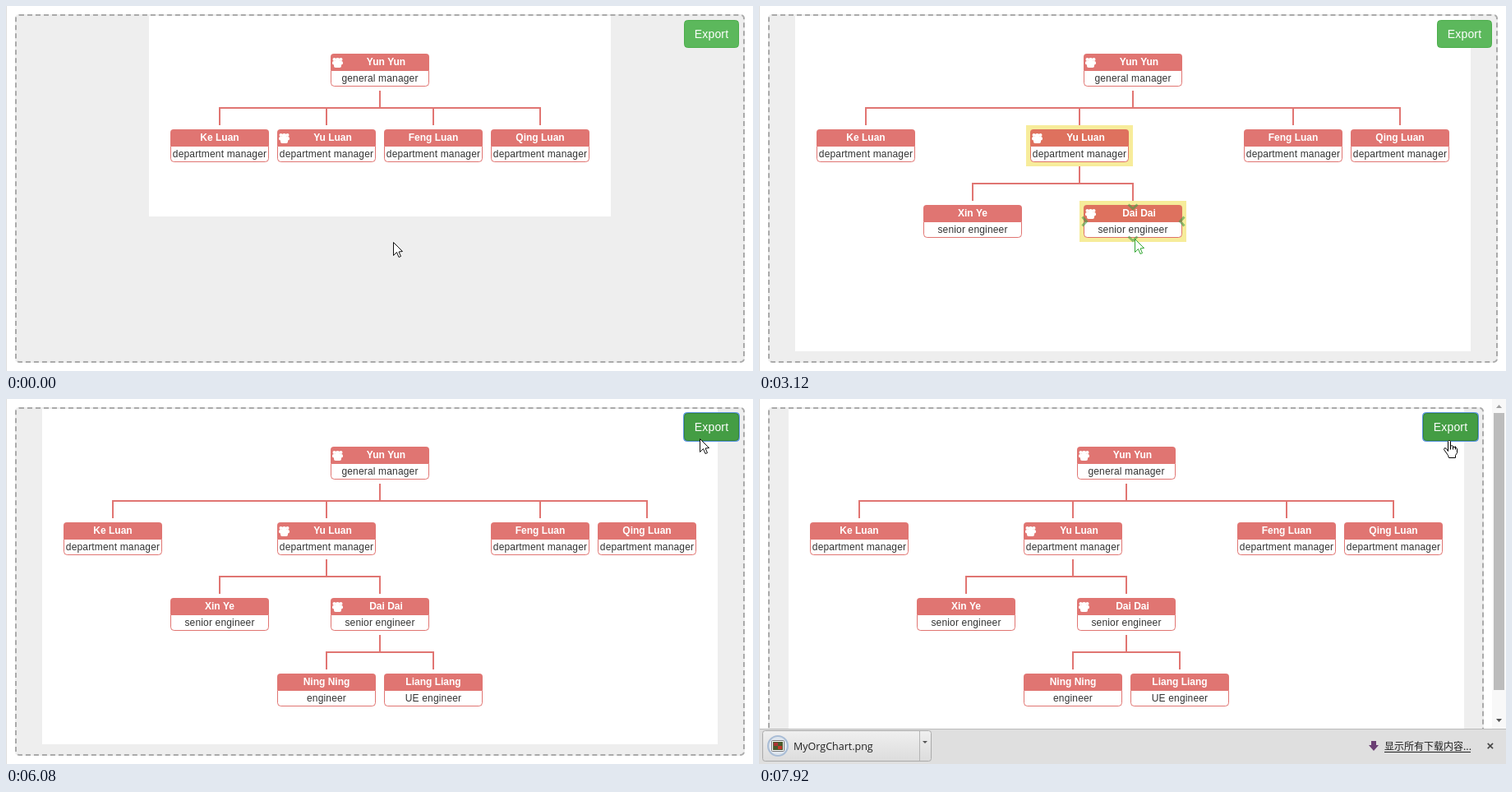
An HTML page with a canvas that plays this animation: 909 px wide and 444 px high, repeating every 8000 ms.

```html
<!DOCTYPE html>
<html lang="en">
<head>
<meta charset="utf-8">
<title>Org chart export</title>
<style>
html, body { margin: 0; width: 909px; height: 444px; overflow: hidden; background: #fff; }
#frame { position: absolute; left: 11px; top: 10px; width: 888px; height: 424px; box-sizing: border-box;
  border: 2px dashed #aaa; border-radius: 5px; background: #eee; }
canvas { position: absolute; left: 0; top: 0; }
</style>
</head>
<body>
<div id="frame"></div>
<canvas id="stage" width="909" height="444"></canvas>
<script>
const LOOP = 8000, FADE = 300;
const OPEN_1 = 1880, OPEN_2 = 3120, BLUR = 4320;
const MASK_ON = 6200, MASK_OFF = 7100, SCROLLBAR = 7430;
const RED = 'rgba(217,83,79,.8)';
const SANS = 'Arial, "Liberation Sans", sans-serif';

const frame = document.getElementById('frame');
const ctx = document.getElementById('stage').getContext('2d');

// Centre x of each node per expansion stage; missing entries are hidden.
const nodes = [
  { name: 'Yun Yun', role: 'general manager', level: 0, x: [455, 455, 455], group: true },
  { name: 'Ke Luan', role: 'department manager', level: 1, x: [260, 195, 130] },
  { name: 'Yu Luan', role: 'department manager', level: 1, x: [390, 390, 390], group: true, hover: [1280, 2180], focus: [1280, OPEN_2] },
  { name: 'Feng Luan', role: 'department manager', level: 1, x: [520, 585, 650] },
  { name: 'Qing Luan', role: 'department manager', level: 1, x: [650, 715, 780], focus: [4850, 4960] },
  { name: 'Xin Ye', role: 'senior engineer', level: 2, x: [, 325, 260] },
  { name: 'Dai Dai', role: 'senior engineer', level: 2, x: [, 455, 455], group: true, hover: [2310, 3380], focus: [2320, BLUR] },
  { name: 'Ning Ning', role: 'engineer', level: 3, x: [, , 390] },
  { name: 'Liang Liang', role: 'UE engineer', level: 3, x: [, , 520] }
];
const panels = [[174, 562, 244], [109, 692, 316], [44, 822, 408]];

// Pointer path: time, x, y
const path = [
  [320, 471, 287], [1040, 431, 198], [1280, 431, 198], [1680, 389, 189], [2120, 389, 189],
  [2400, 475, 271], [2720, 457, 283], [3280, 457, 283], [3680, 608, 346], [3920, 617, 341],
  [4320, 617, 341], [4560, 617, 336], [4640, 617, 336], [5040, 808, 93], [5360, 837, 52],
  [5520, 837, 52], [5680, 844, 48], [7600, 844, 48], [7880, 837, 50]
];

const clamp = v => Math.max(0, Math.min(1, v));
const smooth = v => { v = clamp(v); return v * v * (3 - 2 * v); };
const ramp = (t, start, span = FADE) => smooth((t - start) / span);
const pulse = (t, span) => span ? ramp(t, span[0]) - ramp(t, span[1]) : 0;

function rect(x, y, w, h, fill, radius = 0, stroke) {
  ctx.beginPath();
  ctx.roundRect(x, y, w, h, radius);
  if (fill) { ctx.fillStyle = fill; ctx.fill(); }
  if (stroke) { ctx.strokeStyle = stroke; ctx.lineWidth = 1; ctx.stroke(); }
}

function text(str, x, y, font, color, align = 'center', spacing = 0) {
  ctx.font = font;
  ctx.fillStyle = color;
  ctx.textAlign = align;
  ctx.letterSpacing = spacing + 'px';
  ctx.fillText(str, x, y);
}

function polygon(points, fill, stroke) {
  ctx.beginPath();
  points.forEach(([x, y]) => ctx.lineTo(x, y));
  ctx.closePath();
  ctx.fillStyle = fill;
  ctx.fill();
  if (stroke) { ctx.strokeStyle = stroke; ctx.lineWidth = 1; ctx.stroke(); }
}

function disc(x, y, r, fill) {
  rect(x - r, y - r, 2 * r, 2 * r, fill, r);
}

function chevron(x, y, turn) {
  ctx.save();
  ctx.translate(x, y);
  ctx.rotate(turn);
  ctx.beginPath();
  ctx.moveTo(-5.5, -2.5);
  ctx.lineTo(0, 2.5);
  ctx.lineTo(5.5, -2.5);
  ctx.strokeStyle = 'rgba(68,157,68,.6)';
  ctx.lineWidth = 3;
  ctx.stroke();
  ctx.restore();
}

function groupIcon(x, y) {
  disc(x + 2.5, y + 3, 2, '#fff');
  disc(x + 10.5, y + 3, 2, '#fff');
  rect(x, y + 5, 13, 4.5, '#fff', 2);
  disc(x + 6.5, y + 4, 3, '#fff');
  rect(x + 2, y + 7, 9, 6, '#fff', 2);
}

function drawNode(node, x, y, t) {
  const left = x - 60, glow = pulse(t, node.focus);
  if (glow > 0) rect(left - 5, y - 5, 130, 50, `rgba(238,217,54,${glow / 2})`);
  rect(left, y, 120, 20, RED, [4, 4, 0, 0]);
  rect(left + .5, y + 20.5, 119, 19, '#fff', [0, 0, 4, 4], RED);
  text(node.name, x + (node.group ? 7.5 : 0), y + 14, 'bold 12px ' + SANS, '#fff');
  text(node.role, x, y + 34, '12px ' + SANS, '#333', 'center', .16);
  if (node.group) groupIcon(left + 2, y + 4);
  const arrows = pulse(t, node.hover);
  if (arrows > 0) {
    ctx.save();
    ctx.globalAlpha *= arrows;
    chevron(x, y + 2, 0);
    chevron(x, y + 41, 0);
    chevron(left + 1, y + 20, -Math.PI / 2);
    chevron(left + 120, y + 20, Math.PI / 2);
    ctx.restore();
  }
}

function connect(parentX, childXs, parentY) {
  const first = Math.min(...childXs), last = Math.max(...childXs);
  rect(parentX - 1, parentY + 45, 2, 20, RED);
  rect(first - 1, parentY + 65, last - first + 2, 2, RED);
  childXs.forEach(x => rect(x - 1, parentY + 67, 2, 20, RED));
}

function drawChart(t) {
  const stage = t < OPEN_1 ? 0 : t < OPEN_2 ? 1 : 2;
  const [px, pw, ph] = panels[stage];
  rect(px, 12, pw, ph, '#fff');
  const parents = [455, 390, 455];
  for (let level = 0; level <= stage + 1; level++) {
    const shown = level < 2 ? 1 : ramp(t, level === 2 ? OPEN_1 : OPEN_2);
    const y = 58 + 92 * level;
    const row = nodes.filter(n => n.level === level);
    ctx.save();
    ctx.globalAlpha = shown;
    ctx.translate(0, -40 * (1 - shown));
    if (level) connect(parents[level - 1], row.map(n => n.x[stage]), y - 92);
    row.forEach(n => drawNode(n, n.x[stage], y, t));
    ctx.restore();
  }
}

function drawButton(t, shift) {
  const hot = t >= 5590;
  if (t >= 5900) rect(824.5 - shift, 16.5, 68, 35, '#5c97e0', 4, '#5c97e0');
  rect(825.5 - shift, 17.5, 66, 33, hot ? '#449d44' : '#5cb85c', 4, hot ? '#398439' : '#4cae4c');
  text('Export', 858.5 - shift, 39, '14px ' + SANS, '#fff', 'center', .15);
}

function drawMask(t) {
  rect(13, 12, 884, 420, 'rgba(0,0,0,.3)', 3);
  const turn = (t - MASK_ON) / 2000 * 2 * Math.PI - Math.PI / 2;
  ctx.beginPath();
  ctx.arc(455.5, 220.5, 45, turn + .13, turn + 2 * Math.PI - .13);
  ctx.strokeStyle = 'rgba(255,255,255,.8)';
  ctx.lineWidth = 15;
  ctx.stroke();
}

function drawScrollbar() {
  rect(892, 0, 17, 444, '#f8f8f8');
  rect(894, 17, 13, 337, '#bcbcbc');
  polygon([[897, 11], [900.5, 7], [904, 11]], '#a0a0a0');
  polygon([[897, 389], [900.5, 393], [904, 389]], '#555');
}

function drawDownloads(t) {
  const up = ramp(t, 7340, 260);
  ctx.save();
  ctx.translate(0, 43 * (1 - up));
  rect(1, 401, 908, 43, '#dfdfdf');
  rect(1, 401, 908, 1, '#bbb');
  const item = ctx.createLinearGradient(0, 403, 0, 441);
  item.addColorStop(0, '#f0f0f0');
  item.addColorStop(1, '#dcdcdc');
  rect(4.5, 403.5, 205, 37, item, 3, '#aaa');
  rect(195, 404, 1, 36, '#b5b5b5');
  polygon([[199, 416], [205, 416], [202, 419]], '#555');
  disc(23, 422, 13, '#a9bdd6');
  disc(23, 422, 11, '#dfe6ee');
  rect(15.5, 415.5, 15, 13, '#fff', 1, '#777');
  rect(17, 417, 12, 10, '#4a5a2c');
  rect(18, 418, 5, 4, '#a33');
  rect(23, 422, 5, 4, '#c0392b');
  text('MyOrgChart.png', 42, 427, '12.5px "Open Sans", sans-serif', '#222', 'left');
  polygon([[745, 416], [751, 416], [751, 421], [754, 421], [748, 428], [742, 421], [745, 421]], '#6b3f74');
  text('显示所有下载内容...', 761, 427, '12px "Noto Sans CJK SC", "Noto Sans CJK", sans-serif', '#222', 'left');
  rect(761, 429, 105, 1, '#222');
  text('×', 890, 427, 'bold 15px ' + SANS, '#444');
  ctx.restore();
}

function pointerAt(t) {
  const next = path.findIndex(p => p[0] > t);
  if (next === 0) return path[0].slice(1);
  if (next < 0) return path[path.length - 1].slice(1);
  const [t0, x0, y0] = path[next - 1], [t1, x1, y1] = path[next];
  const k = (t - t0) / (t1 - t0);
  return [x0 + (x1 - x0) * k, y0 + (y1 - y0) * k];
}

function drawPointer(t) {
  const [x, y] = pointerAt(t);
  const hand = t >= 5590 && t < 6060 || t >= MASK_OFF;
  ctx.save();
  ctx.translate(Math.round(x) + .5, Math.round(y) + .5);
  if (hand) {
    polygon([[1, 1], [2, 0], [3, 0], [4, 1], [4, 7], [6, 6], [8, 8], [10, 8], [12, 10], [12, 15], [10, 18],
      [10, 21], [2, 21], [1, 18], [-4, 11], [-3, 9], [-1, 10], [1, 13]], '#fff', '#000');
    for (const fx of [4, 7, 10]) rect(fx - .5, 7, 1, 4, '#000');
  } else {
    polygon([[0, 0], [0, 16], [4, 12], [6.5, 18], [9, 17], [6.5, 11.5], [11, 11]],
      '#fff', t >= OPEN_1 && t < BLUR ? '#2fa52f' : '#111');
  }
  ctx.restore();
}

function draw(t) {
  const scrolled = t >= SCROLLBAR;
  frame.style.width = (scrolled ? 871 : 888) + 'px';
  ctx.clearRect(0, 0, 909, 444);
  rect(0, 0, 1, 444, '#ddd');
  ctx.save();
  if (scrolled) ctx.translate(-8, 0);
  drawChart(t);
  ctx.restore();
  drawButton(t, scrolled ? 17 : 0);
  if (t >= MASK_ON && t < MASK_OFF) drawMask(t);
  if (scrolled) drawScrollbar();
  if (t >= 7340) drawDownloads(t);
  drawPointer(t);
}

const start = performance.now();
function tick() {
  draw((performance.now() - start) % LOOP);
  requestAnimationFrame(tick);
}
tick();
</script>
</body>
</html>
```
